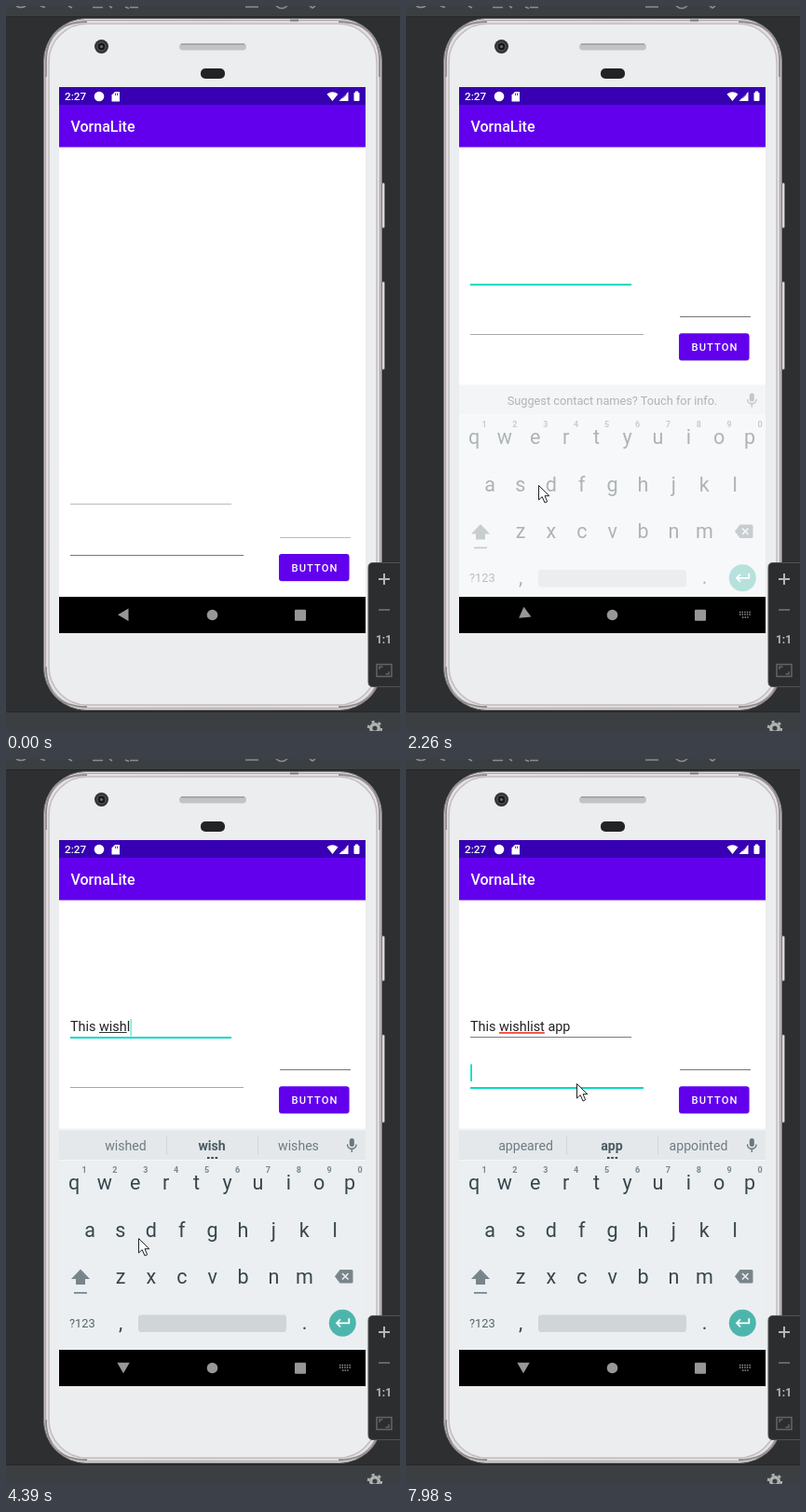
An HTML page for the animation above (8 s loop, 423 px wide and 778 px high).

```html
<!DOCTYPE html>
<html lang="en">
<head>
<meta charset="utf-8">
<title>Form typing demo</title>
<style>
  html, body { margin: 0; width: 100%; height: 100%; overflow: hidden; background: #2d2f31; }
  svg { display: block; }
  text { font-family: Roboto, sans-serif; white-space: pre; }
  .mid { text-anchor: middle; }
  .med { font-weight: 500; }
</style>
</head>
<body>
<svg width="423" height="778" viewBox="0 0 423 778">
  <defs>
    <linearGradient id="rim">
      <stop offset="0" stop-color="#b5b0b2"/><stop offset=".01" stop-color="#e6e1e3"/>
      <stop offset=".5" stop-color="#dfdbdd"/>
      <stop offset=".99" stop-color="#e6e1e3"/><stop offset="1" stop-color="#b0abad"/>
    </linearGradient>
    <linearGradient id="shade" x2="0" y2="1">
      <stop offset="0" stop-color="#000" stop-opacity="0"/><stop offset="1" stop-color="#000" stop-opacity=".06"/>
    </linearGradient>
    <clipPath id="screen"><path d="M57 151H386V634H57z"/></clipPath>
  </defs>

  <!-- editor chrome -->
  <path fill="#3c3f41" d="M0 0H423V11H0zM0 758H423V778H0z"/>
  <path stroke="#242628" d="M0 11.5H423M0 757.5H423"/>
  <g fill="none" stroke="#8b8d8f" stroke-width="1.6">
    <path d="M11 0q5 3 10 0M37 0l5 1.500M67 0l4 2M93 1.500h11M111 0l3 2M128 1l4 1.500M133 1.500h9M257 1h14M290 0q6 5 12 0M326 0l3 2l3-2"/>
    <circle cx="396" cy="775" r="4.300" stroke="#afb1b3" stroke-width="3.400"/>
    <circle cx="396" cy="775" r="7" stroke="#afb1b3" stroke-width="2.400" stroke-dasharray="3.100 4.230"/>
  </g>

  <!-- phone body -->
  <path fill="#dedadb" stroke="#77787a" stroke-width=".7" d="M402 190h3.500q1 0 1 2v44q0 2-1 2H402zM402 296h3.500q1 0 1 2v90q0 2-1 2H402z"/>
  <rect x="40.500" y="13.500" width="363" height="742" rx="46" fill="url(#rim)" stroke="#7b7779"/>
  <rect x="42.500" y="15.500" width="359" height="738" rx="44" fill="none" stroke="#aaa5a7"/>
  <rect x="46" y="19" width="352" height="731" rx="41" fill="#ecedee" stroke="#c2bdbf" stroke-width="1.500"/>
  <path fill="none" stroke="#918c8e" stroke-width="1.800" d="M43 709q0 43 44 43M401 709q0 43-44 43M43 76V60q0-43 44-43M401 76V60q0-43-44-43"/>
  <path stroke="#77787a" stroke-width="2" d="M305 15.500h9"/>
  <circle cx="102.500" cy="43.500" r="7.500" fill="#333436"/>
  <circle cx="102.500" cy="43.500" r="4.500" fill="#17181a" stroke="#606266"/>
  <circle cx="102.500" cy="43.500" r="1.600" fill="#66696e"/>
  <rect x="186" y="40" width="72" height="7.500" rx="3.700" fill="#c3c3c4"/>
  <path stroke="#8f8f91" d="M188 41h68"/>
  <rect x="209" y="67" width="26" height="11" rx="5" fill="#222324"/>

  <!-- status and app bars -->
  <path fill="#fff" d="M57 151H386V634H57z"/>
  <path fill="#3700b3" d="M57 87H386V106H57z"/>
  <path fill="#6200ee" d="M57 106H386V151.500H57z"/>
  <g fill="#fff">
    <text class="med" x="63" y="101" font-size="11.700">2:27</text>
    <circle cx="100" cy="97" r="5.300"/>
    <path d="M117 92h5v10.500h-8.500V95.500z"/>
    <path d="M344.500 94.500q6-4.500 12 0L350.500 102zM367.500 92v10h-10z"/>
    <rect x="373.500" y="92.800" width="6" height="9.200" rx="1"/><path d="M375 91.500h3v2h-3z"/>
    <text class="med" x="69.500" y="135" font-size="16">VornaLite</text>
  </g>
  <path stroke="#3700b3" d="M117.500 93.500v2.500M119.500 93.500v2.500M361.500 99l4-4.500" stroke-width=".8"/>

  <!-- form -->
  <rect id="line1" x="69" width="173"/>
  <rect id="line2" x="69" width="186"/>
  <rect id="line3" x="294" width="76" height="1"/>
  <g id="button">
    <rect x="293" y="589" width="75.500" height="28.700" rx="3" fill="#000" opacity=".2"/>
    <rect x="293" y="588" width="75.500" height="29" rx="3" fill="#6200ee"/>
    <text class="med" x="306.500" y="607" font-size="11.200" letter-spacing="1.100" fill="#fff">BUTTON</text>
  </g>
  <text id="field" x="69" y="292" font-size="14.400" fill="#212121"></text>
  <rect id="compose" y="293" height="1" fill="#333"/>
  <rect id="typo" y="293" height="1.800" fill="#f0483e"/>
  <rect id="caret" width="1.800" height="18.500" fill="#03dac5"/>

  <!-- keyboard -->
  <g clip-path="url(#screen)"><g id="board">
    <path fill="url(#shade)" d="M57 395H386V398.500H57z"/>
    <path fill="#eceff1" d="M57 398.500H386V640H57z"/>
    <path fill="#e4e8eb" d="M57 398.500H386V430H57z"/>
    <path fill="#f4f6f7" d="M57 430H386V431H57z"/>
    <text id="info" class="mid" x="221.500" y="420" font-size="12.750" fill="#37474f">Suggest contact names? Touch for info.</text>
    <g id="words" class="mid" font-size="14.100" fill="#6f7b81">
      <path stroke="#d0d6d9" d="M172.500 404v21M270.500 404v21"/>
      <text x="128.500" y="420"></text>
      <text x="221" y="420" font-weight="700" fill="#4a5a62"></text>
      <text x="314" y="420"></text>
      <path fill="#37474f" d="M216 427h2.500v2H216zM220.300 427h2.500v2h-2.500zM224.600 427h2.500v2h-2.500z"/>
    </g>
    <g fill="#6b777d">
      <rect x="368.800" y="407" width="5" height="9" rx="2.500"/>
      <path fill="none" stroke="#6b777d" stroke-width="1.400" d="M366.500 413.500a4.800 4.800 0 0 0 9.600 0M371.300 418.500v3.500"/>
    </g>
    <g id="keys" class="mid" font-size="21.500" fill="#37474f"></g>
    <path fill="#78868c" d="M80 547.500l10 10.500h-5v6H75v-6h-5zM73 572h14v1.800H73z"/>
    <path fill="#78868c" d="M358.500 548H371q1.500 0 1.500 1.500v11.500q0 1.500-1.500 1.500H358.500L353 555.200z"/>
    <path stroke="#eceff1" stroke-width="1.600" d="M361 552l6.500 6.500M367.500 552l-6.500 6.500"/>
    <text x="68" y="610" font-size="12.800" fill="#546269">?123</text>
    <rect x="142" y="596.500" width="159" height="18.500" rx="3" fill="#d0d5d8"/>
    <circle cx="361.300" cy="605.300" r="14.500" fill="#4db6ac"/>
    <path fill="none" stroke="#fff" stroke-width="1.800" d="M368.300 600.300v5H355M359 601.300l-4 4l4 4"/>
  </g></g>

  <!-- navigation bar -->
  <path d="M57 634H386V673H57z"/>
  <g fill="#979797">
    <path id="back" d="M-6 0L5.500-6.700V6.700z"/>
    <circle cx="221.500" cy="653.500" r="5.800"/>
    <rect x="310" y="647.700" width="12" height="12" rx="1"/>
    <path id="ime" fill="none" stroke="#979797" stroke-width="1.300" stroke-dasharray="1.400 1.200" d="M358 650.500h12.500M358 653h12.500M361 656h7"/>
  </g>

  <!-- zoom panel -->
  <path fill="#2b2d2f" stroke="#505254" d="M424 597.500H394q-5 0-5 5V725.500q0 5 5 5H424z"/>
  <path stroke="#b4b6b8" stroke-width="2" d="M400 615h12M406 609v12"/>
  <path stroke="#636567" stroke-width="2" d="M400 648h12"/>
  <text class="mid" x="405.500" y="684" font-size="12" font-weight="700" fill="#b4b6b8">1:1</text>
  <path fill="none" stroke="#636567" stroke-width="1.500" d="M398 706.500h16v13h-16zM401 712v-3h3.500M411 714v3h-3.500"/>

  <path id="mouse" fill="#fff" stroke="#222" d="M.5.500V16L4.200 12.600L7 19L9.700 17.800L7 11.700H11.800z"/>
</svg>

<script>
const $ = id => document.getElementById(id);
const set = (id, attrs) => { for (const k in attrs) $(id).setAttribute(k, attrs[k]); };
const show = (id, on) => $(id).style.display = on ? '' : 'none';
const clamp = v => Math.min(1, Math.max(0, v));
const TEAL = '#03dac5', LOOP = 8000, FOCUS = 1460, RAISE = 1860, REFOCUS = 7920;

const pen = document.createElement('canvas').getContext('2d');
const textWidth = s => { pen.font = '14.4px Roboto, sans-serif'; return pen.measureText(s).width; };

// keyboard letters, each row at the same pitch
const label = (x, y, s, extra = '') => `<text x="${x}" y="${y}" ${extra}>${s}</text>`;
let letters = label(123, 612, ',') + label(320.5, 612, '.');
[['qwertyuiop', 73, 462], ['asdfghjkl', 90, 513], ['zxcvbnm', 123, 563]].forEach(([row, x, y]) =>
  [...row].forEach((c, i) => letters += label(x + 32.9 * i, y, c)));
for (let i = 0; i < 10; i++)
  letters += label(84 + 32.9 * i, 444, (i + 1) % 10, 'font-size="9" font-weight="700" fill="#78868c"');
$('keys').innerHTML = letters;

// [time, field content]
const typed = [[FOCUS, ''], [2720, 'T'], [2780, 'Th'], [2980, 'Thi'], [3130, 'This'], [3600, 'This ']];
[...'wishlist '].forEach((c, i) => typed.push([3990 + 95 * i, typed.at(-1)[1] + c]));
const start = typed.at(-1)[1];
[[4990, 'a'], [5120, 'ao'], [5360, 'aop'], [6380, 'ao'], [6450, 'a'], [6720, 'ap'], [6850, 'app']]
  .forEach(([time, word]) => typed.push([time, start + word]));

const hints = [[0, ''], [3800, 'is|was|will'], [4050, 'with|w|we'], [4150, 'will|wi|with'], [4250, 'wish|wis|wished'],
  [4340, 'wished|wish|wishes'], [4700, 'wish list|wishlist|wishlists'], [5060, 'and|a|as'], [5380, 'app|aop|also'],
  [6450, 'and|a|as'], [6790, 'app|ap|apply'], [6980, 'appeared|app|appointed']];

// [from, to, x0, y0, x1, y1]
const moves = [[530, 1260, 299, 681, 142, 514], [5840, 5910, 142, 514, 191, 513], [7380, 7900, 191, 513, 183, 348]];

const latest = (list, t) => list.filter(e => e[0] <= t).at(-1) || [0, ''];

function drawMouse(t) {
  const move = latest(moves, t);
  show('mouse', move[0]);
  if (!move[0]) return;
  const [from, to, x0, y0, x1, y1] = move;
  const p = clamp((t - from) / (to - from)), e = p * p * (3 - 2 * p);
  set('mouse', { transform: `translate(${x0 + (x1 - x0) * e} ${y0 + (y1 - y0) * e})` });
}

function drawForm(t) {
  const up = t >= RAISE, second = t >= REFOCUS, first = t >= FOCUS && !second;
  const y1 = up ? 298 : 534;
  set('line1', { y: y1, height: first ? 2 : 1, fill: first ? TEAL : up ? '#7c7c7c' : '#bcbcbc' });
  set('line2', { y: up ? 352 : 589, height: second ? 2 : 1, fill: second ? TEAL : up ? '#a6a6a6' : '#757575' });
  set('line3', { y: up ? 333 : 570, fill: up ? '#757575' : '#bcbcbc' });
  set('button', { transform: `translate(0 ${up ? -236.7 : 0})` });

  const [time, text] = latest(typed, t);
  $('field').textContent = text;

  // the underline of the word being typed trails slightly
  const cut = text.lastIndexOf(' ') + 1;
  const word = text.slice(cut, Math.max(cut, latest(typed, t - 70)[1].length));
  const left = 69 + textWidth(text.slice(0, cut));
  set('compose', { x: left, width: second ? 0 : textWidth(word) });

  const typoX = 69 + textWidth('This ');
  set('typo', { x: typoX, width: t >= 4850 ? textWidth('wishlist') : 0 });

  const since = second ? REFOCUS : time;
  show('caret', t >= FOCUS && (t - since) % 1000 < 500);
  set('caret', second ? { x: 69.2, y: 327.5, opacity: 1 }
    : { x: 69.2 + textWidth(text), y: y1 - 19, opacity: /\S$/.test(text) ? .5 : 1 });
}

function drawKeyboard(t) {
  const p = clamp((t - 2180) / 200);
  set('board', { opacity: p, transform: `translate(0 ${24 * (1 - p) ** 2})` });
  set('back', { transform: `translate(126 653.3) rotate(${-90 * p})` });
  show('ime', t >= RAISE);
  const hint = latest(hints, t)[1];
  show('info', !hint);
  show('words', hint);
  const parts = hint.split('|');
  $('words').querySelectorAll('text').forEach((el, i) => el.textContent = parts[i] || '');
}

function frame() {
  const t = performance.now() % LOOP;
  drawForm(t);
  drawKeyboard(t);
  drawMouse(t);
  requestAnimationFrame(frame);
}
frame();
</script>
</body>
</html>
```
